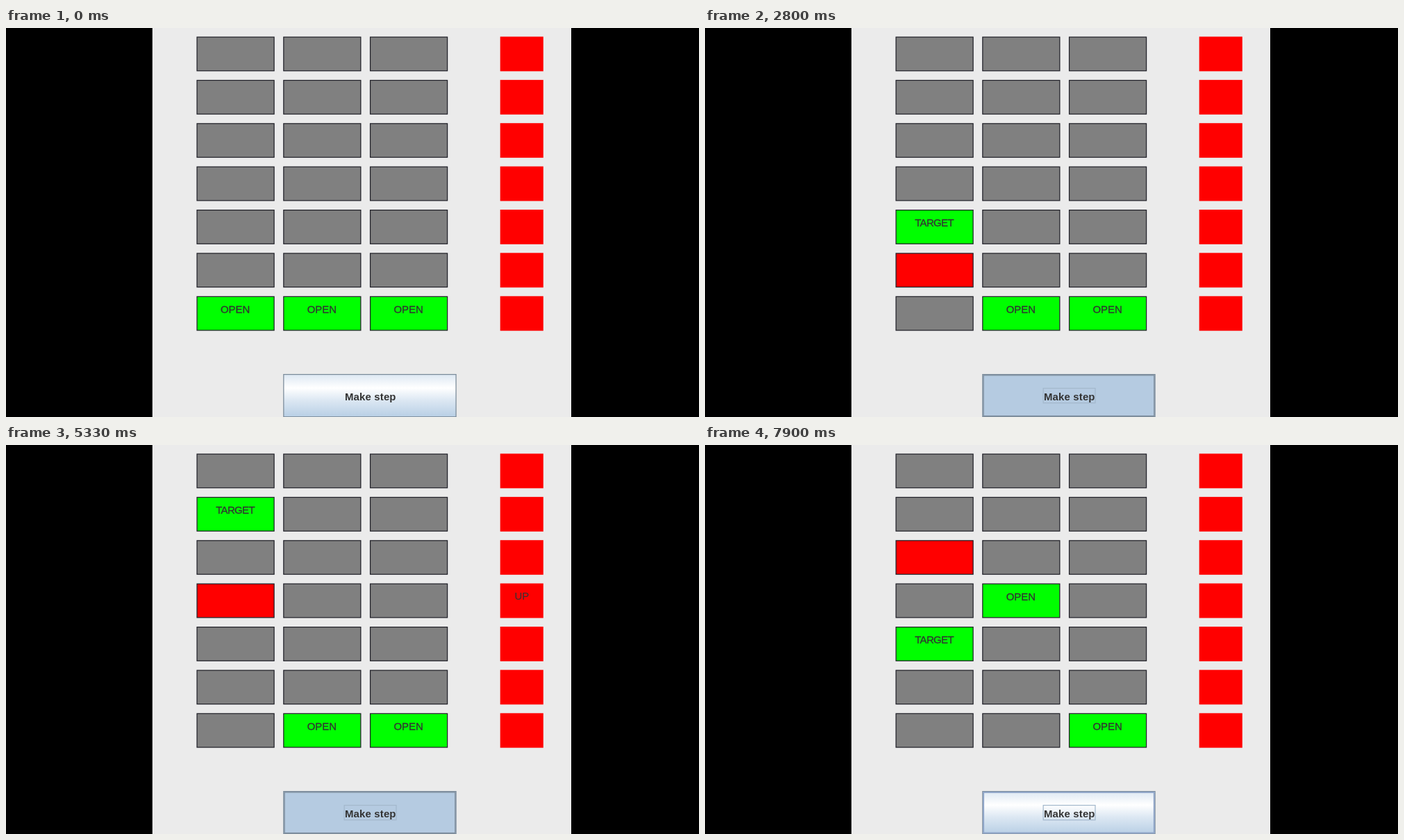
Write an HTML page that moves like this. It is 998 px wide and 561 px high and loops after 8000 ms.

```html
<!DOCTYPE html>
<html lang="en">
<head>
<meta charset="utf-8">
<title>Lift simulator</title>
<style>
  html, body { margin: 0; width: 100%; height: 100%; overflow: hidden; background: #000; }
  svg { display: block; width: 998px; height: 561px; }
  text { font: 12px "Liberation Sans", Arial, sans-serif; fill: #333; text-anchor: middle; }
  .cell { fill: #808080; stroke: #202028; }
  .cell.open, .cell.target { fill: #0f0; }
  .cell.moving { fill: #f00; }
  .cell + text { stroke: #333; stroke-width: .25; }
  .target + text { letter-spacing: -.5px; }
  .call { fill: #f00; }
  .face { fill: url(#metal); stroke: #7a8a99; }
  .edge, .ring { fill: none; }
  .ring { stroke: #a3b8cc; }
  .label { font-weight: bold; letter-spacing: .12px; }
  .hover .edge { stroke: #8fa5c8; stroke-width: 1.6; }
  .press .face { fill: #b5cbe1; }
  .press .edge { stroke: #7a8a99; }
</style>
</head>
<body>
<!-- Interface units: the stage is 800 wide. -->
<svg viewBox="0 0 800 449.7" preserveAspectRatio="xMinYMin slice">
  <defs>
    <linearGradient id="metal" x2="0" y2="1">
      <stop offset="0" stop-color="#dde8f3"/>
      <stop offset=".32" stop-color="#fff"/>
      <stop offset=".6" stop-color="#dde8f3"/>
      <stop offset="1" stop-color="#b8cfe5"/>
    </linearGradient>
  </defs>
  <rect x="169" width="483.5" height="450" fill="#ebebeb"/>
  <g id="shaft"></g>
  <g id="button">
    <rect class="face" x="320.5" y="400.5" width="199" height="49"/>
    <rect class="edge" x="321.5" y="401.5" width="197" height="47"/>
    <rect class="ring" id="ring" x="390.5" y="416.5" width="60" height="17"/>
    <text class="label" x="420.7" y="430.2">Make step</text>
  </g>
</svg>
<script>
const LOOP = 8000, ROWS = 7, COLS = 3, GROUND = ROWS - 1;
const shaft = document.getElementById('shaft');
const button = document.getElementById('button');
const ring = document.getElementById('ring');

function add(tag, attrs) {
  const el = document.createElementNS('http://www.w3.org/2000/svg', tag);
  for (const key in attrs) el.setAttribute(key, attrs[key]);
  return shaft.appendChild(el);
}

const cells = [], calls = [];
for (let row = 0; row < ROWS; row++) {
  const y = 10 + 50 * row;
  for (let col = 0; col < COLS; col++) {
    const x = 220 + 100 * col;
    cells.push({
      row, col,
      box: add('rect', { class: 'cell', x: x + .5, y: y + .5, width: 89, height: 39 }),
      text: add('text', { x: x + 44.6, y: y + 19.4 })
    });
  }
  add('rect', { class: 'call', x: 570.5, y, width: 49.8, height: 40 });
  calls.push(add('text', { x: 595.5, y: y + 18.6 }));
}

// Lifts are [floor row, target row]; a lift without a target stands open.
const idle = [GROUND];
const events = [
  [0, { lifts: [idle, idle, idle], call: null, mode: '', focus: false }],
  [1070, { call: [4, 'UP'], focus: true }],
  [1770, { mode: 'hover' }],
  [2170, { mode: 'press' }],
  [2300, { mode: 'hover', call: null, lifts: [[5, 4], idle, idle] }],
  [2730, { mode: 'press' }],
  [2870, { mode: 'hover', lifts: [[4], idle, idle] }],
  [3170, { mode: 'press' }],
  [3300, { mode: 'hover', lifts: [[3, 1], idle, idle] }],
  [3770, { mode: '' }],
  [4730, { call: [3, 'UP'] }],
  [5130, { mode: 'hover' }],
  [5270, { mode: 'press' }],
  [5400, { mode: 'hover', call: null, lifts: [[2, 1], [5, 3], idle] }],
  [5700, { mode: 'press' }],
  [5840, { mode: 'hover', lifts: [[1], [4, 3], idle] }],
  [6070, { mode: '' }],
  [7200, { call: [4, 'DOWN'] }],
  [7470, { mode: 'hover' }],
  [7700, { mode: 'press' }],
  [7830, { mode: 'hover', call: null, lifts: [[2, 4], [3], idle] }]
];

function cellState([floor, target], row) {
  if (row === target) return 'target';
  if (row !== floor) return '';
  return target === undefined ? 'open' : 'moving';
}

function draw({ lifts, call, mode, focus }) {
  for (const { row, col, box, text } of cells) {
    const state = cellState(lifts[col], row);
    box.setAttribute('class', 'cell ' + state);
    text.textContent = state === 'moving' ? '' : state.toUpperCase();
  }
  calls.forEach((text, row) => {
    text.textContent = call && call[0] === row ? call[1] : '';
  });
  button.setAttribute('class', mode);
  ring.style.display = focus ? '' : 'none';
}

const start = performance.now();
let shown = 0;
function tick() {
  const t = (performance.now() - start) % LOOP;
  const past = events.filter(([at]) => at <= t);
  if (past.length !== shown) {
    shown = past.length;
    draw(Object.assign({}, ...past.map(([, change]) => change)));
  }
  requestAnimationFrame(tick);
}
tick();
</script>
</body>
</html>
```
